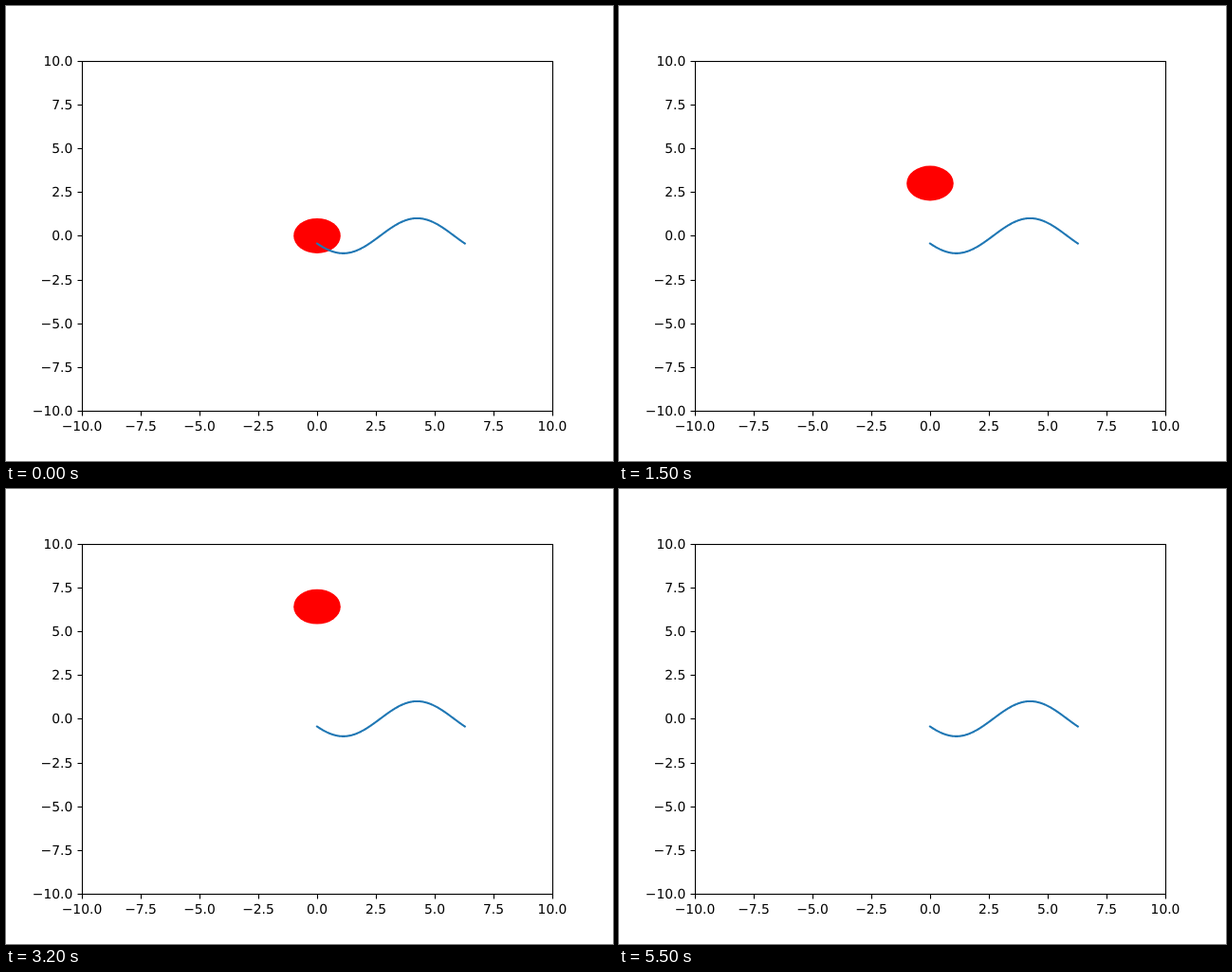
Write an HTML page with a canvas that moves like this. It is 640x480 px and loops after 5.54 s.

```html
<!DOCTYPE html>
<html lang="en">
<head>
<meta charset="utf-8">
<title>Rising ball plot</title>
<style>
  html, body { margin: 0; width: 100%; height: 100%; overflow: hidden; background: #fff; }
  canvas { display: block; }
</style>
</head>
<body>
<canvas id="stage" width="640" height="480"></canvas>
<script>
const ctx = document.getElementById('stage').getContext('2d');

const LOOP = 5540, STEP = 100, RISE = 0.2;
const LIMIT = 10, TICK_GAP = 2.5;
const PT = 100 / 72; // pixels per point
const box = { x: 80, y: 57.6, w: 496, h: 369.6 };

const px = x => box.x + (x + LIMIT) / (2 * LIMIT) * box.w;
const py = y => box.y + (LIMIT - y) / (2 * LIMIT) * box.h;
const snap = v => Math.round(v) + 0.5;

const left = snap(px(-LIMIT)), right = snap(px(LIMIT));
const top_ = snap(py(LIMIT)), bottom = snap(py(-LIMIT));

function segment(x1, y1, x2, y2) {
  ctx.beginPath();
  ctx.moveTo(x1, y1);
  ctx.lineTo(x2, y2);
  ctx.stroke();
}

function drawBall(y) {
  ctx.fillStyle = '#f00';
  ctx.beginPath();
  ctx.ellipse(px(0), py(y), px(1) - px(0), py(0) - py(1), 0, 0, 2 * Math.PI);
  ctx.fill();
}

function drawWave() {
  ctx.strokeStyle = '#1f77b4';
  ctx.lineWidth = 1.5 * PT;
  ctx.lineCap = 'square';
  ctx.lineJoin = 'round';
  ctx.beginPath();
  for (let i = 0; i <= 314; i++) {
    const x = i * 0.02;
    ctx.lineTo(px(x), py(Math.sin(x + 3.6)));
  }
  ctx.stroke();
}

function drawAxes() {
  ctx.strokeStyle = ctx.fillStyle = '#000';
  ctx.lineWidth = 0.8 * PT;
  ctx.lineCap = 'butt';
  ctx.lineJoin = 'miter';
  ctx.font = `${10 * PT}px "DejaVu Sans", sans-serif`;
  ctx.textBaseline = 'alphabetic';
  ctx.textRendering = 'geometricPrecision';

  for (let v = -LIMIT; v <= LIMIT; v += TICK_GAP) {
    const label = v.toFixed(1).replace('-', '\u2212');
    const x = snap(px(v)), y = snap(py(v));
    segment(x, bottom, x, bottom + 5);
    segment(left - 5, y, left, y);
    ctx.textAlign = 'center';
    ctx.fillText(label, px(v), 448);
    ctx.textAlign = 'right';
    ctx.fillText(label, 70.3, y + 4.5);
  }
  ctx.strokeRect(left, top_, right - left, bottom - top_);
}

function draw(t) {
  const step = Math.floor((t % LOOP) / STEP);
  ctx.fillStyle = '#fff';
  ctx.fillRect(0, 0, 640, 480);
  ctx.save();
  ctx.beginPath();
  ctx.rect(box.x, Math.round(box.y), box.w, Math.floor(box.h));
  ctx.clip();
  drawBall(step * RISE);
  drawWave();
  ctx.restore();
  drawAxes();
}

let start;
function tick(now) {
  start ??= now;
  draw(Math.max(0, now - start));
  requestAnimationFrame(tick);
}
draw(0);
requestAnimationFrame(tick);
</script>
</body>
</html>
```
